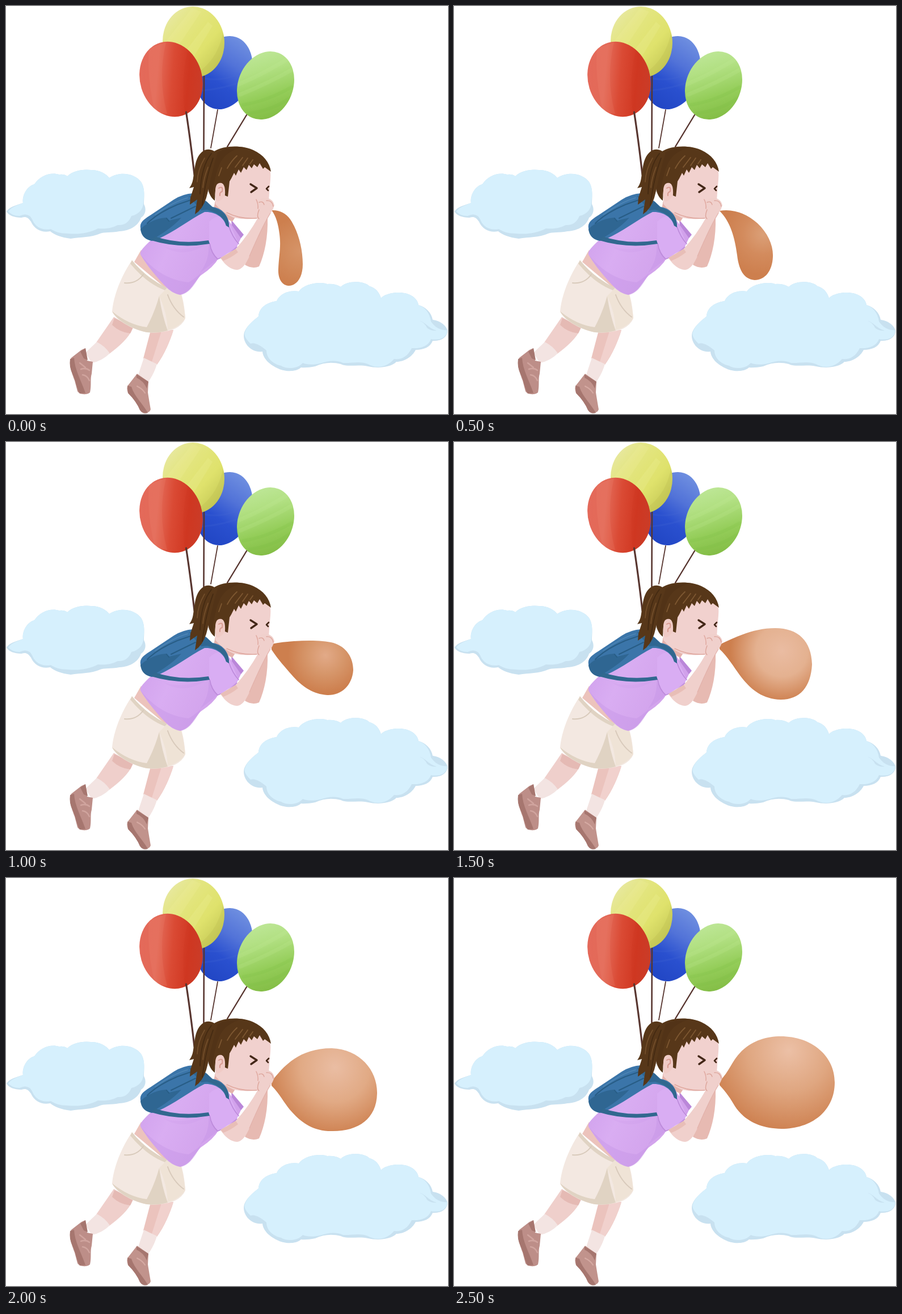
These frames come from a looping animation (779x719 px, 3000 ms). An HTML page:

```html
<!DOCTYPE html>
<html lang="en">
<head>
<meta charset="utf-8">
<title>Balloon girl</title>
<style>
html, body { margin: 0; width: 100%; height: 100%; overflow: hidden; background: #fff; }
svg { display: block; width: 100vw; height: 100vh; }
.line { fill: none; stroke-linecap: round; stroke-linejoin: round; }
</style>
</head>
<body>
<svg viewBox="0 0 779 719" preserveAspectRatio="none">
<defs>
  <linearGradient id="red" x1="0" y1=".4" x2="1" y2=".5">
    <stop offset="0" stop-color="#e4695a"/><stop offset=".3" stop-color="#e36a58"/>
    <stop offset=".52" stop-color="#da4a34"/><stop offset=".75" stop-color="#d13923"/><stop offset="1" stop-color="#cb3f2b"/>
  </linearGradient>
  <linearGradient id="yellow" x1=".1" y1=".1" x2=".95" y2=".85">
    <stop offset="0" stop-color="#e9e9aa"/><stop offset=".3" stop-color="#e3e580"/>
    <stop offset=".6" stop-color="#dfe26c"/><stop offset="1" stop-color="#b9bd4c"/>
  </linearGradient>
  <linearGradient id="blue" x1=".6" y1="0" x2=".4" y2="1">
    <stop offset="0" stop-color="#6f8fe0"/><stop offset=".35" stop-color="#5273d8"/>
    <stop offset=".65" stop-color="#2a50cf"/><stop offset="1" stop-color="#2146c4"/>
  </linearGradient>
  <linearGradient id="green" x1=".35" y1="0" x2=".6" y2="1">
    <stop offset="0" stop-color="#c0e89b"/><stop offset=".3" stop-color="#b2e083"/>
    <stop offset=".65" stop-color="#94cd59"/><stop offset="1" stop-color="#80ba42"/>
  </linearGradient>
  <linearGradient id="shirt" x1="0" y1="0" x2="1" y2=".4">
    <stop offset="0" stop-color="#cf9fec"/><stop offset=".4" stop-color="#d9adf2"/><stop offset="1" stop-color="#d0a0ea"/>
  </linearGradient>
  <radialGradient id="gum" gradientUnits="userSpaceOnUse">
    <stop id="glow" offset="0"/><stop id="mid" offset=".5"/><stop offset="1" stop-color="#cd7f4e"/>
  </radialGradient>
  <clipPath id="inYellow"><ellipse cx="330.500" cy="63.500" rx="54.400" ry="62.600" transform="rotate(-5 330.500 63.500)"/></clipPath>
  <clipPath id="inRed"><ellipse cx="291" cy="129" rx="54.700" ry="67.100" transform="rotate(-17 291 129)"/></clipPath>
  <clipPath id="inGreen"><ellipse cx="457.500" cy="140" rx="48.400" ry="61.700" transform="rotate(22 457.500 140)"/></clipPath>
</defs>

<!-- clouds -->
<path fill="#c8e1f0" d="M1 362C6 354 18 351 30 347C28 335 36 318 50 314C60 299 78 292 94 297Q103 296 108 300C118 290 137 287 150 289C166 289 178 297 182 303C200 291 226 294 238 310C246 322 243 340 243 349C248 358 246 368 238 373C234 386 220 396 200 397C184 400 174 398 166 401C150 408 132 407 114 410C97 408 85 403 78 397C62 400 50 393 44 380C38 371 34 371 27 373C15 373 4 369 1 362Z"/>
<path fill="#d6f0fd" d="M4 362C10 354 20 351 30 347C28 335 36 318 50 314C60 299 78 292 94 297Q103 296 108 300C118 290 137 287 150 289C166 289 178 297 182 303C200 291 226 294 238 310C246 322 243 340 242 348C241 359 234 367 221 370C217 381 208 387 197 386C186 392 174 393 162 392C148 400 126 403 110 401C96 401 86 398 79 393C66 396 53 391 47 378C43 367 34 365 24 370C15 370 9 367 4 362Z"/>
<path fill="#c8e1f0" d="M420 575C425 562 438 553 445 547C446 530 462 522 477 520C482 507 500 500 516 503C525 490 552 485 566 490Q580 489 590 495C600 484 630 483 641 494C652 497 658 505 661 515C668 506 690 503 703 506C717 509 726 518 727 527C740 530 750 541 752 553C764 554 776 563 778 572C778 585 765 591 752 590C748 601 736 606 722 606C716 618 702 627 688 627C678 637 655 639 638 635C620 631 602 637 590 631C575 627 560 628 545 635Q530 638 520 637C510 646 490 644 480 639C466 633 453 622 452 609C440 611 430 604 425 598C419 590 418 582 420 575Z"/>
<path fill="#d6f0fd" d="M421 575C425 562 438 553 445 547C446 530 462 522 477 520C482 507 500 500 516 503C525 490 552 485 566 490Q580 489 590 495C600 484 630 483 641 494C652 497 658 505 661 515C668 506 690 503 703 506C717 509 726 518 727 527C738 530 747 541 749 556C758 569 769 572 778 571C777 585 764 590 749 587C745 599 731 604 715 603C708 618 696 624 684 622C672 636 656 639 642 633C626 624 610 630 594 629C580 623 567 626 553 630C541 633 530 632 523 629C514 640 494 640 485 634C470 631 459 620 459 607C448 597 437 592 431 595C425 589 419 583 421 575Z"/>
<path fill="#c8e1f0" d="M729 555C738 556 743 567 759 572Q748 573 742 567Q737 557 729 555Z"/>

<!-- balloons -->
<ellipse cx="385" cy="117.500" rx="47.700" ry="66" transform="rotate(18 385 117.500)" fill="url(#blue)"/>
<path class="line" stroke="#4668d2" stroke-width="3" opacity=".2" d="M351 128Q390 134 425 112M346 149Q385 146 424 130"/>
<g clip-path="url(#inYellow)">
  <path fill="url(#yellow)" d="M260 0H400V140H260Z"/>
  <path fill="#f0efa0" opacity=".2" d="M282 62L328 4L344 10L297 80ZM314 83L356 28L364 35L322 104Z"/>
  <path fill="#adb145" opacity=".2" d="M384 42C376 79 364 98 337 119L352 130L394 91Z"/>
</g>
<g clip-path="url(#inGreen)">
  <path fill="url(#green)" d="M400 75H515V205H400Z"/>
  <path class="line" stroke="#c4ed9b" stroke-width="7" opacity=".16" d="M408 139Q456 119 500 91M413 156Q463 136 508 110"/>
  <path class="line" stroke="#75b438" stroke-width="6" opacity=".14" d="M418 174Q459 168 503 143M429 189Q468 184 499 163"/>
</g>
<g class="line" stroke="#583630">
  <path stroke-width="2.600" d="M349 124L348.500 257"/>
  <path stroke-width="1.800" d="M373 183L361 250"/>
  <path stroke-width="2.400" d="M424 192L390 248"/>
</g>
<g clip-path="url(#inRed)">
  <path fill="url(#red)" d="M230 60H352V200H230Z"/>
  <path fill="#ef9280" opacity=".14" d="M252 75L282 64Q267 127 284 190L263 188Q248 130 252 75Z"/>
  <path fill="#bd2c19" opacity=".1" d="M323 69Q307 123 316 196L349 180V90Z"/>
</g>
<path class="line" stroke="#583630" stroke-width="3.200" d="M317.500 187Q325 236 332 297"/>

<!-- legs and shoes -->
<path fill="#efcfcb" d="M190 548L224 567C216 586 199 600 182 613L159 593Z"/>
<path fill="#e5bab4" d="M191 550L224 566L219 577Q200 575 187 562Z"/>
<path fill="#f3e4e2" d="M160 592Q174 599 183 612Q169 626 151 629L140 611Z"/>
<path fill="#ebc3bd" d="M256 568L295 571C289 591 279 614 266 632L242 621Z"/>
<path fill="#f1d1cd" d="M274 573L295 571C289 591 279 614 266 632L257 627Z"/>
<path fill="#f3e4e2" d="M243 620L266 631Q261 648 251 662L233 650Z"/>
<path fill="#bd8e88" d="M140 603L133 606L115 620C110 630 116 647 121 660L126 679C130 685 142 686 148 681C151 668 148 658 151 648L153 627L143 625Z"/>
<path fill="#a6766f" d="M113 622L120 620C121 641 132 659 140 682L130 683C124 673 123 659 117 648Q111 636 113 622ZM131 609L140 603L144 624L137 621Z"/>
<path class="line" stroke="#d0a49e" stroke-width="2.500" d="M132 640Q141 637 147 642M135 650Q143 651 147 660M130 629L140 637"/>
<path fill="#c1938c" d="M231 648L251 662L250 681Q252 694 255 711Q252 719 241 716L236 712Q230 697 215 682Q211 671 217 666Z"/>
<path fill="#a6766f" d="M214 669L221 671C226 688 242 702 250 717Q241 720 236 712Q230 697 215 682ZM230 649L251 662L248 674Q243 661 230 655Z"/>
<path class="line" stroke="#d5aaa3" stroke-width="2" d="M231 670Q241 675 245 682"/>

<!-- waist and shorts -->
<path fill="#ecc3bc" d="M238 430L226 451L282 498L306 506Z"/>
<path fill="#f3e8e1" d="M222 448C207 470 190 505 187 538C191 550 217 569 248 575Q267 577 283 573C300 571 313 560 316 550C315 531 312 517 309 508L282 496Q248 480 222 448Z"/>
<path fill="#e0d3c3" d="M222 448Q246 478 284 497L280 501Q248 489 219 454ZM270 511Q275 545 285 572Q267 577 248 575C219 569 193 551 187 538Q216 562 248 566Q262 540 270 511Z"/>
<path fill="#efe3d6" d="M270 511L284 497L309 508Q314 532 316 550Q306 566 285 571Q284 540 270 511Z"/>
<path class="line" stroke="#d8cabb" stroke-width="2" d="M242 473Q230 490 209 488M285 509Q294 534 313 548"/>

<!-- far arm and sleeve -->
<path fill="#e7bab2" d="M461 372C462 407 456 437 446 459Q434 464 421 456Q436 425 444 389Z"/>
<path fill="#ba87d9" d="M397 377L419 403Q412 413 400 419Z"/>

<!-- head -->
<path fill="#e4b3ac" d="M369 342L411 361L399 380L365 364Z"/>
<path fill="#f1d1ce" d="M388 292L420 272L461 280Q468 290 466 306Q464 328 463 344L448 373Q427 378 401 373Q381 364 369 349V315Z"/>
<path class="line" stroke="#dfa79e" stroke-width="1.500" d="M389 364Q412 376 442 374M441 341Q445 349 444 357"/>
<path fill="#573719" d="M361 261C372 249 398 245 420 249C446 254 464 271 467 292L456 284L453 287L447 277L443 284L437 279L433 286L428 280L424 289L419 284L414 294L410 288L405 299L402 294L397 304L394 309L391 336L386 334L383 314Q371 310 369 325L368 343Q354 333 356 307Z"/>
<path fill="#452911" d="M363 266Q380 247 420 249Q391 253 378 275Q366 300 364 338L356 327Q353 289 363 266Z" opacity=".25"/>
<g class="line" stroke="#7d5731" stroke-width="1.800">
  <path d="M407 264Q397 273 390 286M417 267L404 284M426 268L417 281M435 271L430 278M380 285L375 299"/>
</g>
<path fill="#f0cbc6" d="M380 312Q369 310 369 326Q367 340 373 345Q383 341 386 332Q387 315 380 312Z"/>
<path class="line" stroke="#d89b91" stroke-width="2" d="M375 321Q383 316 381 327Q376 328 377 334"/>
<path class="line" stroke="#432718" stroke-width="3.400" d="M431 314L442 321L432 328"/>
<path class="line" stroke="#432718" stroke-width="2.600" d="M463 318L459 322L462 325"/>

<!-- shirt -->
<path fill="url(#shirt)" d="M263 405C245 423 235 431 237 438C246 454 263 475 280 493Q291 506 307 509C326 505 332 486 343 475Q366 460 375 444L405 428L414 409L391 376Q370 358 344 362Z"/>
<path fill="#c18fe1" opacity=".35" d="M237 438Q272 482 322 487Q335 479 344 470Q326 508 307 509C286 506 256 468 237 438ZM357 422Q359 447 342 470L372 447Z"/>
<path fill="#c18fe1" opacity=".15" d="M277 423Q306 435 355 419Q311 447 277 423Z"/>
<path fill="#d9adf3" d="M358 380Q376 363 391 376L410 419Q397 434 374 446Q363 437 358 418Z"/>
<path class="line" stroke="#bd8bdb" stroke-width="1.700" d="M359 419Q362 436 373 446Q391 440 407 425M393 389Q399 407 410 419"/>

<!-- backpack -->
<path fill="#3b75a9" d="M237 391C235 380 246 374 257 367L296 341Q312 331 330 330L353 344L364 354C380 356 394 369 393 390L388 387C384 372 368 362 350 363C324 376 295 399 269 410L257 414C246 412 238 404 237 391Z"/>
<path fill="#2f6692" d="M244 387Q263 374 282 373L288 378L309 373Q291 393 255 413Q239 410 237 393ZM322 334L354 345L366 358L344 360L334 349Z"/>
<path fill="#31688f" d="M262 406Q306 421 357 413L359 419Q306 428 256 413ZM362 354Q394 363 393 390L388 387Q384 367 354 359Z"/>
<path class="line" stroke="#285d86" stroke-width="2" d="M249 383Q267 365 302 350L328 341M291 374L334 353M283 374L287 379"/>
<path class="line" stroke="#4e86b5" stroke-width="1.500" d="M263 368Q295 345 320 338"/>

<!-- ponytail -->
<path fill="#573719" d="M373 260C354 244 339 257 334 278C329 300 332 309 323 321L331 319L325 338L324 350L337 341L333 367Q347 358 353 338C359 316 363 288 373 260Z"/>
<path class="line" stroke="#442a12" stroke-width="1.800" d="M362 260Q344 282 342 331M365 268Q352 303 346 351"/>
<path class="line" stroke="#75502c" stroke-width="1.600" d="M350 268Q338 288 337 310M356 284Q348 305 347 320"/>

<path id="bubble" fill="url(#gum)"/>

<!-- near arm and hand -->
<path fill="#f0d0cc" d="M378 444L405 428Q428 402 443 375Q442 366 446 358Q444 350 445 345Q450 336 460 338Q471 341 473 351Q470 361 466 365C453 386 441 413 429 441Q419 464 407 465Q391 464 378 444Z"/>
<path fill="#e8beb7" d="M378 444L405 428L409 434Q396 444 383 449Z"/>
<path class="line" stroke="#dda69c" stroke-width="1.400" d="M446 346Q453 343 455 350M459 343Q469 342 471 353M446 359Q441 372 446 375"/>
<path class="line" stroke="#e2b1aa" stroke-width="1.200" d="M466 365C453 386 441 413 429 441"/>
</svg>
<script>
const HOLD = 500;
// outline, glow centre, glow radius, glow and middle colours
const poses = [
  ["M468 360C480 359 493 364 501 376C515 397 523 427 523 455C523 479 512 493 498 493C486 492 479 480 480 463C481 439 485 425 482 402C480 385 476 370 468 360Z", 518, 432, 60, "#d69468", "#d18a5b"],
  ["M468 361C491 357 515 365 535 383C553 400 563 422 562 442C561 467 548 483 530 483C511 482 502 465 499 439C495 408 487 380 468 361Z", 545, 402, 72, "#dba078", "#d38b5d"],
  ["M468 356C500 350 550 347 577 354C600 361 612 380 612 402C610 430 590 447 566 446C540 444 522 431 505 412C492 397 480 384 468 366Z", 563, 376, 66, "#e2aa88", "#d6966a"],
  ["M468 357C500 342 530 328 566 328C607 328 630 351 631 392C629 431 610 454 576 454C541 453 520 433 503 410C493 396 482 378 468 365Z", 578, 368, 91, "#eabca2", "#e4b190"],
  ["M468 358C484 340 510 300 574 300C625 302 655 340 654 380C653 425 620 447 573 446C536 446 515 425 500 408C490 396 482 380 468 366Z", 580, 334, 121, "#eabda3", "#e1aa85"],
  ["M468 358C485 342 489 323 506 306C525 287 550 279 576 279C630 279 671 313 671 360C671 411 630 442 577 442C536 441 510 425 495 402C487 388 480 378 468 365Z", 590, 304, 146, "#ecc0a6", "#dfa680"]
];
const get = id => document.getElementById(id);
const set = (node, values) => {
  for (const key in values) node.setAttribute(key, values[key]);
};
let shown = -1;

function draw(ms) {
  const index = Math.floor(ms / HOLD) % poses.length;
  if (index === shown) return;
  shown = index;
  const [d, cx, cy, r, glow, mid] = poses[index];
  set(get("bubble"), { d });
  set(get("gum"), { cx, cy, r });
  set(get("glow"), { "stop-color": glow });
  set(get("mid"), { "stop-color": mid });
}

const start = performance.now();
function tick() {
  draw(performance.now() - start);
  requestAnimationFrame(tick);
}
tick();
</script>
</body>
</html>
```
